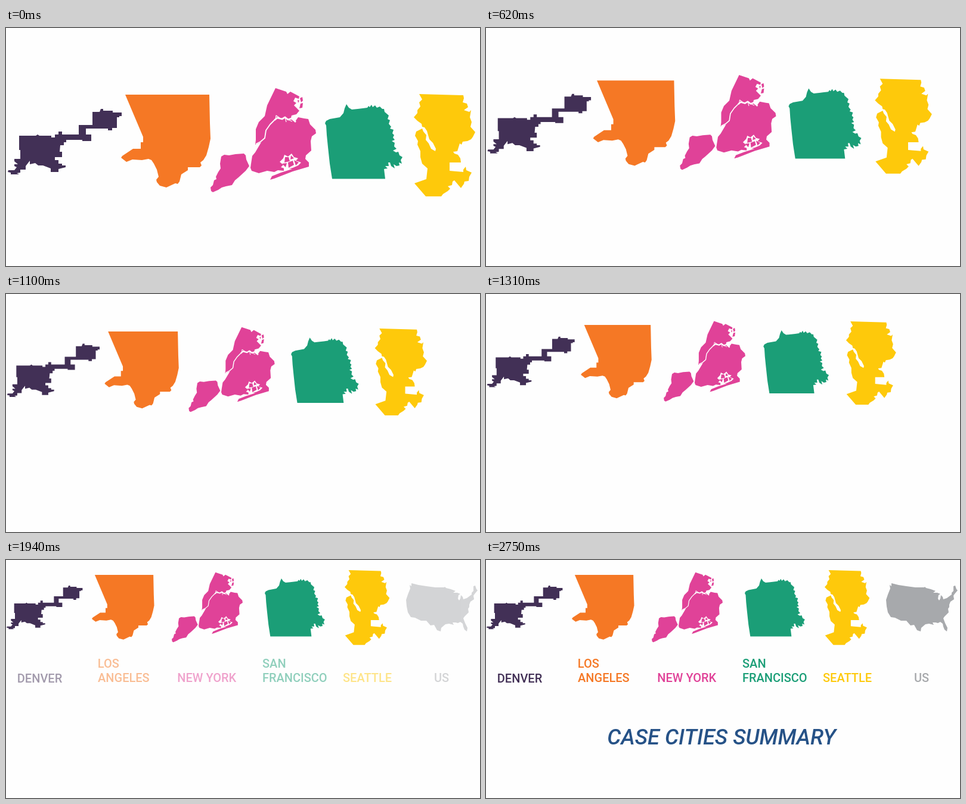
An HTML page that plays this animation: 795 by 400 pixels, repeating every 3.75 s.

```html
<!DOCTYPE html>
<html lang="en">
<head>
<meta charset="utf-8">
<title>Case cities summary</title>
<style>
  html, body { margin: 0; width: 100%; height: 100%; overflow: hidden; background: #fefefe; }
  svg { display: block; width: 795px; height: 400px; }
  text { font: 500 20px Roboto, Arial, sans-serif; }
  #title { font-size: 36.4px; font-style: italic; fill: #265287; }
</style>
</head>
<body>
<svg id="stage" viewBox="0 0 795 400">
  <g id="cities"></g>
  <g id="fade">
    <path fill="#a7a9ac" d="M680 39L692 42 705 44 720 46 735 46 736 45 738 47 746 49 754 52 750 55 757 55 762 57 759 59 758 65 760 68 762 65 763 59 766 62 767 66 773 64 777 61 781 58 781 55 784 52 784 44 787 43 789 49 791 51 786 57 784 60 785 66 779 70 777 75 777 79 775 82 776 88 769 95 767 98 770 106 774 114 773 120 769 117 767 112 766 107 762 104 758 106 754 105 749 105 751 109 743 107 737 108 730 114 729 120 723 118 718 109 712 110 705 102 696 102 686 97 679 96 674 88 672 78 671 67 674 58 678 48 677 42 680 44z"/>
  </g>
  <text id="title" x="203.2" y="310">CASE CITIES SUMMARY</text>
</svg>
<script>
const LOOP = 3750, STEP = 30;
const MOVE_AT = 200, MOVE_STEPS = 55;
const FADE_AT = 1520, FADE_FOR = 870, SLOW_AT = 1880;
const TITLE_AT = 2750;

// Each shape is drawn at its starting place; from/to give its top left corner.
const cities = [
  { color: '#423056', from: [3, 136], to: [1, 43], scale: .667,
    art: `<path d="M145 141H157L159 136H163V139H179V142H194V148H190V150H186V168H178V172H171V169H134V179H143V190H128V188H101V192H97V197H91L90 208H94V217H82V222H88V228H94V231H100V234L88 237V242H75V236L62 231H54L49 227 40 229V223L33 232V238H24V243L18 244 22 246H8V243L3 242 4 239H14L18 234 14 232V229H20L14 224V220H24V205H22V181H50L53 179 56 181H76V184H82V179H88V174H94V179H122V163H145z"/>` },
  { color: '#f57825', from: [193, 112], to: [144, 25], scale: .697,
    art: `<path d="M200 112H341L342 160 343 186 340 200 336 214 331 222 326 226 328 231 325 234H305V239L294 246 291 258 288 262 284 261 269 268 258 265 253 259 252 255 256 250 253 238 248 228 244 222 239 220 228 222 212 221 202 225 193 218 195 215 213 203H226V192H230V183z"/>` },
  { color: '#e04298', from: [343, 100], to: [278, 20], scale: .672,
    art: `<path d="M361 216L366 213 374 214 385 212 399 211 402 214 403 221 408 232 402 240 390 251 384 256 379 264 369 266 362 268 356 272 347 276 344 274 343 268 347 264 349 256 353 254 352 250 356 242 360 236 359 228z"/>
      <path d="M452 101L470 107 472 111 477 107 492 115 491 119 485 117 482 123 487 126 483 130 487 134 492 139 487 145 479 147 478 151 485 157 490 150 500 152 507 153 510 162 519 171 520 177 513 182 511 190 512 206 503 214 502 220 508 226V233L481 241 450 253 443 255 446 249 461 243 480 237 474 236 466 235 466 240 456 239 450 242 438 240 424 244 412 240 410 235 411 228 413 215 418 209 428 192 418 196 419 188 419 170 424 158 434 148 438 130z"/>
      <path d="M493 118L497 116 498 122 495 125zM494 127L498 126 497 134 492 135zM489 121L492 122 490 126z"/>
      <g fill="none" stroke="#fefefe" stroke-linejoin="round">
        <path stroke-width="1.8" d="M419 195L427 191 434 185 436 172 443 162 450 155"/>
        <path stroke-width="2.8" d="M450 155L455 151 463 153 468 150 473 154 479 152 486 158"/>
        <path stroke-width="1.2" d="M452 154L453 147 459 151M468 150L470 158M473 154L480 157"/>
      </g>
      <path fill="#fefefe" d="M459 225L465 219 467 213 473 216 479 211 483 217 490 219 486 223 495 226 490 231 481 235 470 237 461 234 465 230z"/>
      <path d="M468 217L474 217 476 224 467 226zM478 214L483 219 477 221zM463 228L471 227 469 234zM473 226L481 223 483 230 474 235zM483 222L491 226 486 231z"/>`},
  { color: '#1b9e77', from: [535, 128], to: [434, 31], scale: .776,
    art: `<path d="M535 160L537 156 543 153 560 150 566 143 568 135 571 128 575 134 580 137 590 136 598 135 606 134 608 131 610 133 613 129 615 133 619 130 622 134 627 132 631 136 634 136 635 141 642 147 640 153 644 155 642 161 646 166 644 169 650 171 648 177 651 180 649 184 652 188 647 190 652 193 651 199 655 203 649 206 654 209 658 208 660 214 665 217 662 222 664 228 659 226 660 231 655 232 650 229 652 236 646 232 644 226 641 226 642 232 636 232 640 236 634 237 636 253.5H547L543 228 540 200 538 180 537 164z"/>` },
  { color: '#fec90b', from: [684, 111], to: [568, 17], scale: .731,
    art: `<path d="M693 111L767 113 768 118 766 125 773 127 775 133 768 138 777 141 780 138 778 150 781 158 779 166 787 175 783 183 780 187 774 190 766 191 764 196 761 194 757 207 750 208 752 211 758 213 762 219 763 226H744V240L767 242V238L771 233 772 239 781 243 777 250 776 257 769 258 768 262 763 269 752 256 749 258 748 264 741 266 745 270 741 274 733 279 730 283H704L685 261 705 254 707 236 698 228 695 217 695 207 690 196 691 190 686 181 688 174 698 169 700 174 705 180 704 188 709 194 713 203 720 207 721 203 716 193 710 187 706 173 702 167 698 166 697 161 690 156 684 150 690 143 690 138 695 132 693 125 698 120z"/>` }
];

const labels = [
  ['DENVER', 18.8, 206, 0], ['LOS', 153.7, 181, 1], ['ANGELES', 154, 205, 1],
  ['NEW YORK', 287.3, 205, 2], ['SAN', 430, 181, 3], ['FRANCISCO', 430, 205, 3],
  ['SEATTLE', 565, 205, 4], ['US', 718, 205, 5]
];

const byId = id => document.getElementById(id);
const clamp = v => Math.max(0, Math.min(1, v));
const group = byId('cities'), fade = byId('fade'), title = byId('title');

group.innerHTML = cities.map(c => `<g fill="${c.color}">${c.art}</g>`).join('');
fade.innerHTML += labels.map(([word, x, y, i]) =>
  `<text x="${x}" y="${y}" fill="${i < 5 ? cities[i].color : '#a7a9ac'}">${word}</text>`).join('');

function place(p) {
  cities.forEach(({ from, to, scale }, i) => {
    const k = 1 + (scale - 1) * p;
    const [x, y] = from.map((a, j) => a + (to[j] - a) * p - a * k);
    group.children[i].setAttribute('transform', `matrix(${k} 0 0 ${k} ${x} ${y})`);
  });
}

function draw(t) {
  const step = Math.floor((t - MOVE_AT) / STEP);
  place(clamp((step + 1) / MOVE_STEPS));
  const tick = t < SLOW_AT ? MOVE_AT + step * STEP
    : SLOW_AT + Math.floor((t - SLOW_AT) / (2 * STEP)) * 2 * STEP;
  fade.setAttribute('opacity', clamp((tick - FADE_AT) / FADE_FOR));
  title.setAttribute('visibility', t < TITLE_AT ? 'hidden' : 'visible');
}

const start = performance.now();
function frame() {
  draw((performance.now() - start) % LOOP);
  requestAnimationFrame(frame);
}
frame();
</script>
</body>
</html>
```
